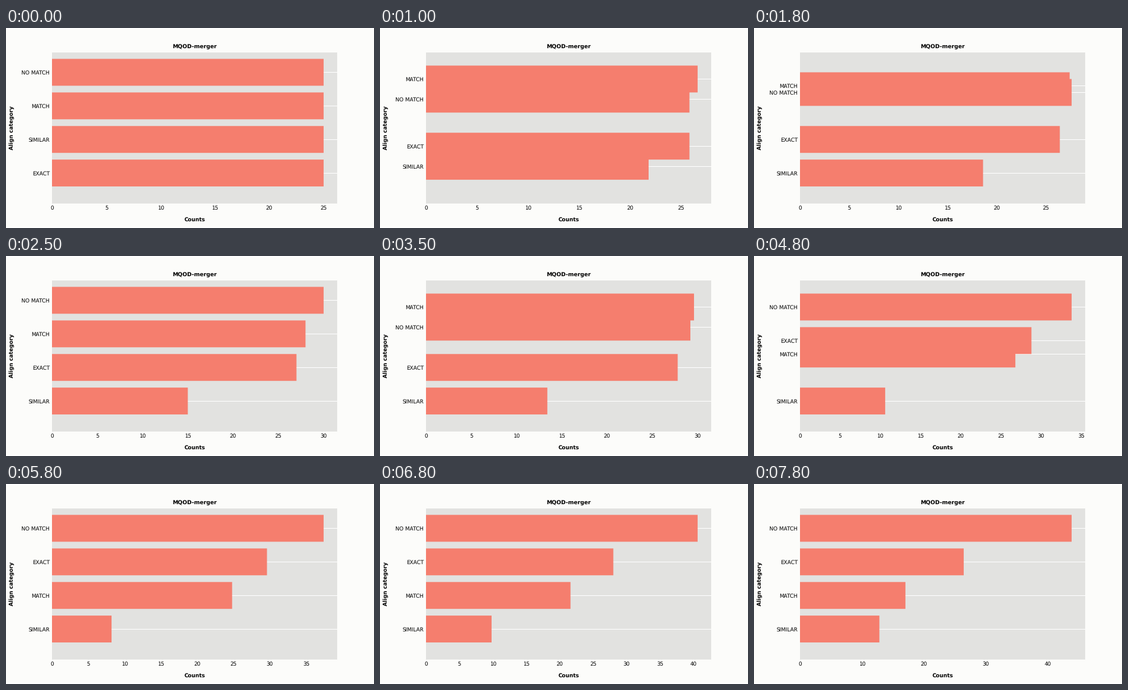
A matplotlib script that plays this animation: 600 px wide and 327 px high, repeating every 8 s.

```python
import numpy as np
import matplotlib.pyplot as plt
from matplotlib.animation import FuncAnimation
from matplotlib.patches import Rectangle

W, H, DPI = 600, 327, 100
PX = 72 / DPI                      # points per pixel
LEFT, RIGHT, TOP, BOTTOM = 75, 540, 39.5, 286.5

PAPER, PANEL, SALMON = "#fcfcfa", "#e2e2e0", "#f57e6e"

STEPS = 5                          # steps from one period to the next
NAMES = ["EXACT", "SIMILAR", "MATCH", "NO MATCH"]
COUNTS = np.array([
    [25, 25, 25, 25],
    [26, 21, 27, 26],
    [27, 15, 28, 30],
    [28, 13, 30, 29],
    [29, 10, 26, 35],
    [30, 7, 24, 39],
    [25, 14, 18, 43],
    [32, 8, 13, 47],
])
# Rank 1 is the lowest bar; ties keep the column order.
RANKS = COUNTS.argsort(axis=1, kind="stable").argsort(axis=1) + 1


def tween(table):
    periods = np.arange(len(table))
    steps = np.arange((len(table) - 1) * STEPS + 1) / STEPS
    return np.column_stack([np.interp(steps, periods, col) for col in table.T])


values = tween(COUNTS)
places = tween(RANKS)
# The axis only ever grows.
limits = 1.05 * np.maximum.accumulate(values.max(axis=1))

plt.rcParams.update({
    "font.family": "DejaVu Sans",
    "text.hinting": "none",
    "axes.linewidth": 0,
})

fig = plt.figure(figsize=(W / DPI, H / DPI), dpi=DPI, facecolor=PAPER)
for y, h in ((0, 2), (H - 2, 2)):
    fig.add_artist(Rectangle((0, y / H), 1, h / H, color="white", lw=0))

ax = fig.add_axes([LEFT / W, 1 - BOTTOM / H,
                   (RIGHT - LEFT) / W, (BOTTOM - TOP) / H], facecolor=PANEL)
ax.spines[:].set_visible(False)
ax.set_axisbelow(True)
ax.grid(axis="y", color="white", lw=1 * PX)
ax.tick_params(length=0, pad=3.7 * PX, labelsize=8.7 * PX)
ax.set_ylim(0.1, 4.6)

bars = ax.barh(places[0], values[0], height=0.8, color=SALMON, lw=0)
for bar in bars:
    bar.set_snap(False)


def caption(x, y, text, size, **kw):
    fig.text(x / W, 1 - y / H, text, fontsize=size * PX, fontweight="bold",
             ha="center", va="baseline", **kw)


caption(307.5, 33, "MQOD-merger", 9.05)
caption(307.5, 316.3, "Counts", 8.75)
caption(12.4, 162.8, "Align category", 8.75,
        rotation=90, rotation_mode="anchor")


def draw(frame):
    step = frame * 2 // 5          # a new step every 250 ms on a 100 ms clock
    for bar, value, place in zip(bars, values[step], places[step]):
        bar.set_width(value)
        bar.set_y(place - 0.4)
    ax.set_yticks(places[step], NAMES)
    ax.set_ylim(0.1, 4.6)
    ax.set_xlim(0, limits[step])
    return list(bars)


anim = FuncAnimation(fig, draw, frames=80, interval=100,
                     repeat=True, repeat_delay=0, blit=False)
plt.show()
```
